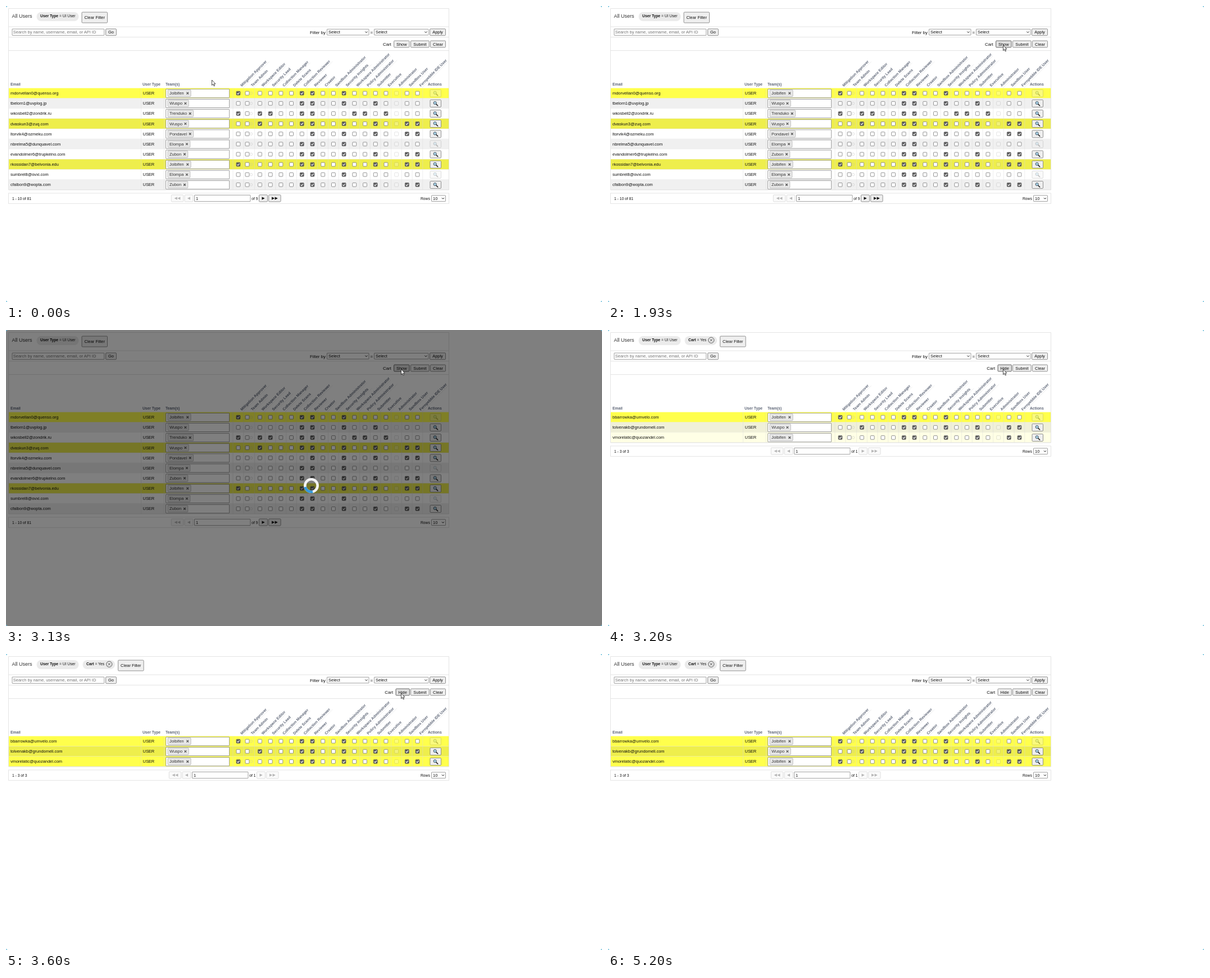
An HTML page that plays this animation: 1061 by 528 pixels, repeating every 5670 ms.

```html
<!DOCTYPE html>
<html lang="en">
<head>
<meta charset="utf-8">
<title>All Users</title>
<style>
  html, body { margin: 0; width: 100%; height: 100%; overflow: hidden; background: #fff; }
  svg { display: block; width: 100vw; height: 100vh; }
  text { font-family: "Liberation Sans", Arial, sans-serif; font-size: 7.46px; fill: #111; }
  .small { font-size: 6.72px; }
  .label { font-size: 7.84px; }
  .head { font-size: 6.72px; font-weight: bold; fill: #5f6778; }
  .hint { fill: #757575; }
  .mid { text-anchor: middle; }
  .line { stroke: #dedede; stroke-width: .8; fill: none; }
  .cell { stroke: #d8d8d8; stroke-width: .6; opacity: .75; }
  .field { fill: #fff; stroke: #767676; stroke-width: .7; }
  .btn { fill: #efefef; stroke: #6f6f6f; stroke-width: .75; }
  .hover .btn { fill: #e0e0e0; stroke: #333; }
  .off { opacity: .3; }
</style>
</head>
<body>
<svg id="stage" viewBox="0 0 1061 528" preserveAspectRatio="none"></svg>
<script>
const LOOP = 5670, TOP = 146.5, ROW = 18.14;

const labels = ['Mitigation Approver', 'Team Admin', 'Workspace Editor', 'Security Lead',
  'Collection Manager', 'Delete Scans', 'Collection Reviewer', 'Reviewer', 'Creator',
  'Sandbox Administrator', 'Security Insights', 'Workspace Administrator',
  'Policy Administrator', 'Submitter', 'Executive', 'Administrator', 'Sandbox User',
  'Fernpebble IDE User'];

// Team name and the place of its remove mark
const teams = {
  J: ['Jolbifen', 323.3], W: ['Wuspo', 319.4], T: ['Trenduko', 327.7],
  P: ['Pondavel', 327.7], E: ['Elompa', 322], Z: ['Zubon', 318]
};

// Email, team, ticked columns (a = first), flags: y = highlighted, f = fades in, d = disabled action
const allUsers = [
  ['mdorvellan0@quenso.org', 'J', 'aghk', 'yd'],
  ['tbelorn1@uvplog.jp', 'W', 'ghkn', ''],
  ['wkosbell2@zondrik.ru', 'T', 'acdghlmo', ''],
  ['dvaskun3@zuq.com', 'W', 'cghknqr', 'y'],
  ['ltorvik4@ozmeku.com', 'P', 'hknqr', ''],
  ['nbrelma5@dunquavel.com', 'E', 'ghk', 'd'],
  ['evandolmer6@trupkelno.com', 'Z', 'ghknqr', ''],
  ['rkossidan7@belvonia.edu', 'J', 'aghknqr', 'y'],
  ['sumbrel8@ovxi.com', 'E', 'ghk', 'd'],
  ['cfalbon9@wopta.com', 'Z', 'ghknqr', '']
];
const cartUsers = [
  ['bbarrowka@umvelo.com', 'J', 'aghk', 'yd'],
  ['tolvenakb@grundomeli.com', 'W', 'cghknqr', 'f'],
  ['vmorelatic@quozandel.com', 'J', 'aghknqr', 'f']
];

const text = (x, y, s, cls = '', more = '') =>
  `<text x="${x}" y="${y}" class="${cls}" ${more}>${s}</text>`;
const rect = (x, y, w, h, more) =>
  `<rect x="${x}" y="${y}" width="${w}" height="${h}" ${more}/>`;
const path = (d, more) => `<path d="${d}" ${more}/>`;
const group = (body, more = '') => `<g ${more}>${body}</g>`;
const cross = (x, y, r, color, w) =>
  path(`M${x - r} ${y - r}l${2 * r} ${2 * r}m0 ${-2 * r}l${-2 * r} ${2 * r}`,
    `stroke="${color}" stroke-width="${w}"`);
const field = (x, y, w, h) => rect(x, y, w, h, 'class="field" rx=".6"');
const box = (x, y, w, h) => rect(x, y, w, h, 'class="btn" rx="1.3"');

function button(x, y, w, h, s, id = '') {
  return group(box(x, y, w, h) + text(x + w / 2, y + h / 2 + 2.7, s, 'mid'), id && `id="${id}"`);
}

function select(x, y, w, s) {
  return field(x, y, w, 10.6) + text(x + 2.6, y + 8, s) +
    path(`M${x + w - 6.6} ${y + 4.3}l2 2l2 -2`, 'fill="none" stroke="#111" stroke-width="1"');
}

function pill(x, w, name, value) {
  return rect(x, 11, w, 16, 'rx="8" fill="#ebebeb"') +
    text(x + 6.6, 20.4, `<tspan font-weight="bold">${name}</tspan> = ${value}`, 'small');
}

const columnX = i => i === 0 ? 413.5 : i === 1 ? 429.5 : 414.6 + 18.7 * i;

function checkbox(i, y, on) {
  const x = columnX(i);
  const tick = on
    ? path(`M${x - 2} ${y + .1}l1.5 1.6l2.7 -3.3`, 'fill="none" stroke="#fff" stroke-width="1.1"')
    : '';
  return group(rect(x - 3.4, y - 3.4, 6.8, 6.8,
    `rx="1" fill="${on ? '#5c5c5c' : '#fff'}" stroke="${on ? '#5c5c5c' : '#707070'}" stroke-width=".75"`) + tick,
    i === 15 ? 'opacity=".25"' : '');
}

function lens(y) {
  return path(`M765.6 ${y + 1.1}l3 2.9`, 'stroke="#222" stroke-width="1.6" stroke-linecap="round"') +
    `<circle cx="763.7" cy="${y - .8}" r="2.6" fill="#a9d3e8" stroke="#3b4650" stroke-width=".9"/>`;
}

function userRow([email, team, ticks, flags], i) {
  const y = TOP + ROW * i, mid = y + 9.1, odd = i % 2;
  const [name, markX] = teams[team];
  let out = rect(5, y, 783.5, ROW, `fill="${odd ? '#f0f0f0' : '#fff'}"`);
  if (/[yf]/.test(flags)) {
    out += rect(5, y, 783.5, ROW,
      `fill="${odd ? '#eeee4c' : '#ffff4c'}" ${flags === 'f' ? 'class="fade"' : ''}`);
  }
  let grid = `M5 ${y + ROW}H788.5`;
  for (const x of [240.5, 281.5, 404, 423]) grid += `M${x} ${y}v${ROW}`;
  for (let c = 0; c < 17; c++) grid += `M${442.6 + 18.7 * c} ${y}v${ROW}`;
  out += path(grid, 'class="cell" fill="none"');
  out += text(8, mid + 2.6, email) + text(243.5, mid + 2.6, 'USER');
  out += field(284.6, y + 1.7, 113, 15.2);
  out += rect(288, mid - 6, markX - 282.2, 11.8, 'rx="1" fill="#e9e9e9" stroke="#a8a8a8" stroke-width=".7"');
  out += text(291, mid + 2.6, name, '', 'style="fill:#333"') + cross(markX, mid, 1.9, '#555', 1.2);
  for (let c = 0; c < 18; c++) out += checkbox(c, mid, ticks.includes(String.fromCharCode(97 + c)));
  out += `<circle cx="436.5" cy="${mid}" r="2.2" fill="none" stroke="#bbb" stroke-width=".7" opacity=".6"/>`;
  return out + group(box(755, mid - 6.4, 19.5, 13) + lens(mid), flags.includes('d') ? 'class="off"' : '');
}

// Paging button with one or two arrow heads
function pageButton(x, y, heads, dir, on) {
  const w = heads === 2 ? 21.5 : 15, c = x + w / 2;
  let arrows = '';
  for (let k = 0; k < heads; k++) {
    const ax = c + (k - (heads - 1) / 2) * 5.6;
    arrows += `M${ax + dir * 2.7} ${y}l${-dir * 5.2} -2.6v5.2z`;
  }
  return group(box(x, y - 6.2, w, 12.2) + path(arrows, 'fill="#111"'), on ? '' : 'class="off"');
}

function pager(count, range, pages, dx) {
  const top = TOP + ROW * count + 6, y = top + 9.2, more = pages > 1;
  return rect(4.5, top, 784, 18.4, 'class="line"') +
    text(11, y + 2.4, range, 'small') +
    pageButton(294.3 + dx, y, 2, -1, false) + pageButton(318 + dx, y, 1, -1, false) +
    field(335.5 + dx, y - 5.8, 99.5, 11.4) + text(338 + dx, y + 2.6, '1') +
    text(437.3 + dx, y + 2.4, 'of ' + pages, 'small') +
    pageButton(450.5 + dx, y, 1, 1, more) + pageButton(467.6 + dx, y, 2, 1, more) +
    text(738, y + 2.6, 'Rows', 'small') + select(757.5, y - 5.2, 25, '10');
}

const table = (users, range, pages, dx) =>
  users.map(userRow).join('') +
  path(`M4.5 ${TOP}V${TOP + ROW * users.length}H788.5V${TOP}`, 'class="line"') +
  pager(users.length, range, pages, dx);

function header() {
  let out = path('M4.5 146.5V4.5H788.5V146.5M4.5 37H788.5M4.5 55.5H788.5M4.5 79.5H788.5', 'class="line"');
  out += text(10.6, 21, 'All Users', '', 'style="font-size:8.96px;fill:#333"') + pill(54.5, 75, 'User Type', 'UI User');
  out += field(11, 41, 163.8, 11.4) + text(12.8, 49.4, 'Search by name, username, email, or API ID', 'hint');
  out += button(177.6, 40.8, 18.8, 11.8, 'Go');
  out += text(541, 49.5, 'Filter by', 'label') + select(571.5, 41.3, 74.5, 'Select');
  out += text(648.6, 49.5, '=', 'label') + select(655.5, 41.3, 96.5, 'Select');
  out += button(754.5, 40.8, 28, 11.8, 'Apply');
  out += button(720.5, 62, 32.8, 11.8, 'Submit') + button(755.5, 62, 27, 11.8, 'Clear');
  out += text(8, 142.3, 'Email', 'head') + text(243, 142.3, 'User Type', 'head') +
    text(284, 142.3, 'Team(s)', 'head') + text(751, 142.3, 'Actions', 'head');
  labels.forEach((s, i) => {
    out += group(text(0, 0, s, 'head') + path(`M0 2.6h${s.length * 3.5}`, 'stroke="#e6e6e6" stroke-width=".6"'),
      `transform="translate(${420 + 18.74 * i} 144.3) rotate(-45)"`);
  });
  return out;
}

const allView = button(135, 11, 45.5, 19, 'Clear Filter') +
  text(671, 70.8, 'Cart', 'label') + button(690.6, 62, 27.4, 11.8, 'Show', 'show') +
  table(allUsers, '1 - 10 of 81', 9, 0);

const cartView = pill(136.5, 57.5, 'Cart', 'Yes') +
  '<circle cx="183.7" cy="18.2" r="5.1" fill="none" stroke="#333" stroke-width=".8"/>' +
  cross(183.7, 18.2, 2.2, '#333', .8) +
  button(199.6, 11, 45.5, 19, 'Clear Filter') +
  text(674.3, 70.8, 'Cart', 'label') + button(694, 62, 24.4, 11.8, 'Hide', 'hide') +
  table(cartUsers, '1 - 3 of 3', 1, -4);

const ring = 'cx="543.5" cy="277.5" r="11.2" fill="none" stroke-width="4.6"';
const busyView = rect(0, 0, 1061, 528, 'rx="4" fill="#000" opacity=".5"') +
  `<circle ${ring} stroke="#f3f3f3"/>` +
  `<circle id="arc" ${ring} stroke="#3498db" pathLength="4" stroke-dasharray="1 3"/>`;

const stage = document.getElementById('stage');
stage.innerHTML = rect(0, 0, 1061, 528, 'fill="#4fb0d2"') + rect(0, 0, 1061, 528, 'rx="4" fill="#fff"') +
  header() + group(allView, 'id="all"') + group(cartView, 'id="cart"') + group(busyView, 'id="busy"') +
  path('M0 0V9.4L2.2 7.4L3.7 10.9L5.1 10.3L3.6 6.9H6.5Z',
    'id="cursor" fill="#fff" stroke="#111" stroke-width=".75" stroke-linejoin="round"');

const el = id => document.getElementById(id);
const [all, cart, busy, arc, cursor, show, hide] =
  ['all', 'cart', 'busy', 'arc', 'cursor', 'show', 'hide'].map(el);
const fades = stage.querySelectorAll('.fade');
const clamp = (v, lo, hi) => Math.min(hi, Math.max(lo, v));
const visible = (node, on) => node.style.display = on ? '' : 'none';

function cursorAt(n) {
  const k = n - 66;
  if (k > 0) return [703.5 - 75.2 * k + 2.06 * k * k, 70 + 68.1 * k - 2.45 * k * k];
  const u = clamp((n - 11) / 18, 0, 1);
  return [366.5 + 337 * (1 - (1 - u) ** 1.6), 132 - 62 * u ** 1.5];
}

function draw(ms) {
  const n = Math.floor(ms * .015 + .051); // 15 steps a second
  const [x, y] = cursorAt(n);
  const over = y >= 62 && y <= 74 && x >= 690 && x <= 718.5;
  visible(all, n < 48);
  visible(cart, n >= 48);
  visible(busy, n >= 31 && n < 48);
  visible(cursor, n < 78);
  arc.setAttribute('transform', `rotate(${4 + 13 * (n - 31) - 135} 543.5 277.5)`);
  cursor.setAttribute('transform', `translate(${x} ${y})`);
  show.classList.toggle('hover', over);
  hide.classList.toggle('hover', over);
  fades.forEach(f => f.setAttribute('opacity', clamp((n - 47) / 7, 0, 1)));
}

const start = performance.now();
function tick() {
  draw((performance.now() - start) % LOOP);
  requestAnimationFrame(tick);
}
tick();
</script>
</body>
</html>
```
